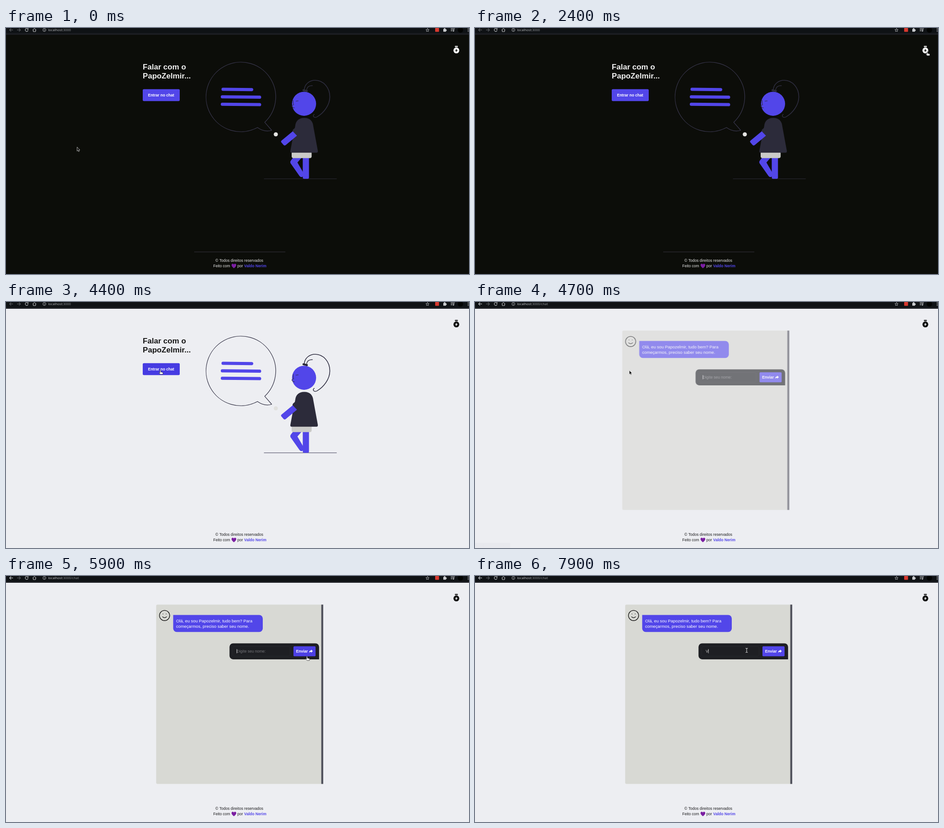
Write an HTML page with a canvas that moves like this. It is 1026x546 px and loops after 8000 ms.

```html
<!DOCTYPE html>
<html lang="pt">
<head>
<meta charset="utf-8">
<title>Chat</title>
<style>
  html, body { margin: 0; width: 100%; height: 100%; overflow: hidden; background: #0c0d09; }
  canvas { display: block; width: 1026px; height: 546px; }
</style>
</head>
<body>
<canvas id="stage" width="1026" height="546"></canvas>
<script>
const W = 1026, H = 546, LOOP = 8000, STEP = 100;
const SANS = '"Liberation Sans", Arial, sans-serif';
const UI = '"Noto Sans", "Open Sans", sans-serif';
const VIOLET = '#5246e9', INK = '#2f2e41', BODY = '#2c2b3a';
const THEMES = {
  dark: { bg: '#0c0d09', text: '#f0f0f0', foot: '#e6e6e6', icon: '#ffffff', line: '#36353f', outline: '#3a384f' },
  light: { bg: '#edeef2', text: '#161616', foot: '#1d1d1f', icon: '#101010', line: null, outline: '#2f2e41' }
};
const BUTTON = [303, 135.7, 82, 26.5], SEND = [637, 156, 49, 22.2];
const FIELD = [502.5, 156.5, 127, 21.5], TOGGLE = [989, 38, 19, 20];

// pointer way-points: time, x, y
const PATH = [
  [0, 157, 264], [200, 157, 264], [400, 296, 306], [500, 296, 306], [900, 374, 175], [1000, 374, 175],
  [1100, 372, 158], [1300, 350, 149], [1600, 366, 147], [1900, 987, 119], [2100, 996, 78], [2400, 1002, 52],
  [3700, 1002, 52], [3900, 940, 80], [4200, 430, 146], [4400, 342, 151], [5000, 341, 152],
  [5200, 318, 166], [5500, 560, 205], [5700, 650, 208], [5800, 650, 208], [5900, 667, 178],
  [6100, 664, 190], [6700, 642, 218], [6800, 644, 218], [7100, 606, 166], [7400, 615, 196],
  [7800, 615, 196], [7900, 602, 165], [8000, 602, 165]
];

const screen = document.getElementById('stage').getContext('2d');
const layerCanvas = document.createElement('canvas');
layerCanvas.width = W;
layerCanvas.height = H;
const layer = layerCanvas.getContext('2d');
let c = screen;

const clamp = v => Math.max(0, Math.min(1, v));
const inside = (p, [x, y, w, h]) => p.x >= x && p.x <= x + w && p.y >= y && p.y <= y + h;

function paint(path, fill, stroke, width = 1) {
  const shape = path instanceof Path2D ? path : new Path2D(path);
  if (fill) { c.fillStyle = fill; c.fill(shape); }
  if (stroke) {
    c.strokeStyle = stroke;
    c.lineWidth = width;
    c.lineCap = c.lineJoin = 'round';
    c.stroke(shape);
  }
}
function box(x, y, w, h, r, fill, stroke, width) {
  const p = new Path2D();
  p.roundRect(x, y, w, h, r);
  paint(p, fill, stroke, width);
}
function disc(x, y, r, fill, stroke, width) {
  const p = new Path2D();
  p.arc(x, y, r, 0, Math.PI * 2);
  paint(p, fill, stroke, width);
}
function text(str, x, y, size, color, bold, family = SANS) {
  c.font = `${bold ? 'bold ' : ''}${size}px ${family}`;
  c.fillStyle = color;
  c.fillText(str, x, y);
}
function at(x, y, draw) {
  c.save();
  c.translate(x, y);
  draw();
  c.restore();
}

function withLayer(alpha, dx, draw) {
  layer.clearRect(0, 0, W, H);
  c = layer;
  draw();
  c = screen;
  c.globalAlpha = alpha;
  c.drawImage(layerCanvas, dx, 0);
  c.globalAlpha = 1;
}

function toolbar(chat) {
  const lit = '#c9cbce', dim = '#5d6064';
  box(0, 0, W, 15, 0, '#1c1e23');
  box(0, 0, W, 11.5, 0, '#0f1215');
  paint('M15 4.4H8 M11 1.2L7.8 4.4L11 7.6', null, chat ? lit : dim, 1.1);
  paint('M25 4.4H32 M29 1.2L32.2 4.4L29 7.6', null, dim, 1.1);
  paint('M48.6 2.4A3.3 3.3 0 1 0 49 5.4', null, lit, 1.1);
  paint('M49.6 0.6V3.6H46.6Z', lit);
  paint('M59.2 4.4L63 0.8L66.8 4.4 M60.3 4V8H65.7V4', null, lit, 1);
  disc(85, 4.4, 3.4, null, '#b4b6b9', 0.9);
  paint('M85 4.2V6.2 M85 2.6V2.7', null, '#b4b6b9', 0.9);
  text('localhost', 93.4, 7, 7.45, chat ? '#c4c6c9' : '#b0b2b5', false, UI);
  const hostWidth = c.measureText('localhost').width;
  text(':3000' + (chat ? '/chat' : ''), 93.4 + hostWidth, 7, 7.45, '#8f9296', false, UI);

  const star = new Path2D();
  for (let i = 0; i < 10; i++) {
    const a = i * Math.PI / 5 - Math.PI / 2, r = i % 2 ? 1.8 : 3.8;
    star.lineTo(934 + r * Math.cos(a), 4.8 + r * Math.sin(a));
  }
  star.closePath();
  paint(star, null, lit, 0.8);
  box(951, 0, 8.6, 8.6, 1, '#d8392f');
  box(969, 2, 6.2, 6.2, 0.8, lit);
  disc(972, 1.6, 1.4, lit);
  disc(975.4, 5, 1.4, lit);
  paint('M986 1.6H991.5 M986 4H991.5 M986 6.4H989 M992.6 6.6V1.6H994.2', null, lit, 1);
  disc(991.6, 6.8, 1.3, lit);
  disc(1007, 4.4, 6, '#030403');
  for (const y of [1.4, 4.4, 7.4]) disc(1024.2, y, 0.9, lit);
}

function toggle(theme) {
  box(994.6, 39.8, 6.8, 2.3, 1, theme.icon);
  box(995.6, 42.9, 4.8, 3, 0.5, theme.icon);
  disc(998, 49.8, 6.5, theme.icon);
  paint('M999.3 45.8L994.9 50.6H997.4L996.6 54L1001.1 48.9H998.5Z', theme.bg);
}

function footer(theme) {
  if (theme.line) box(417, 496.4, 202, 1, 0, theme.line);
  text('© Todos direitos reservados', 464, 518.6, 8.55, theme.foot);
  text('Feito com', 459.2, 531.4, 8.55, theme.foot);
  text('por', 512.7, 531.4, 8.55, theme.foot);
  text('Valdo Nerim', 527.7, 531.4, 8.55, VIOLET, true);
  paint('M505 533.2C502 530.6 499.8 529 499.8 526.2C499.8 522.8 504 522.4 505 525.2' +
    'C506 522.4 510.2 522.8 510.2 526.2C510.2 529 508 530.6 505 533.2Z', '#7b1fa2');
}

function illustration(theme) {
  const bubble = new Path2D(), rad = Math.PI / 180;
  bubble.arc(520.5, 153, 77.2, 61.4 * rad, (360 + 46.8) * rad);
  bubble.lineTo(588.8, 227);
  bubble.bezierCurveTo(577, 231, 566, 227, 557.5, 221);
  paint(bubble, null, theme.outline, 1.2);
  paint('M481 136L544.4 136.8 M479.4 152.8L562 153.6 M479.4 169.3L562 170.1', null, VIOLET, 7);
  paint('M572 334.7H732.5', null, theme === THEMES.dark ? '#2e2d38' : '#3f3d56', 1.1);

  // ponytail and head
  paint('M660.8 138C661.5 124 673 116 685 116C704 116 717.6 133 717.6 153C717.6 171 704 189 689 197.4' +
    'C683 200.5 678 195 683 191.6', null, INK, 1.6);
  paint('M666 138C667 130.5 672 127.6 679 128', null, INK, 1.5);
  disc(660.5, 168.2, 26.7, VIOLET);
  at(663, 139.2, () => {
    c.rotate(0.25);
    box(-6, -2.2, 12, 4.4, 1.8, BODY);
  });
  paint('M642.6 162.2L647.6 161.7 M636.4 160.6C636 165 636.6 168 637.4 170.6C635.6 171.2 634 171 633.6 172.6' +
    'C633.4 174.4 634.4 175.2 635.6 175.4C635.4 176.8 637 177.2 639.4 177', null, INK, 1.1);

  // legs, skirt, torso, arm
  box(657.6, 285, 13.8, 49.8, 3, VIOLET);
  paint('M636 288L655 288L645.8 298.4L659.4 322Q661.5 326 658 329.5Q653.6 333 650.4 328.6' +
    'L630.4 300Q629 297 631 294.5Z', VIOLET);
  box(633, 274, 44.3, 14.8, 4, '#cacac8');
  paint('M641 217C642 206 649 199.4 661 199.4C673 199.4 680 206.5 680.8 217L691 272.6Q691.6 276.8 688 276.8' +
    'H633Q629.4 276.8 630.2 272.6L636.8 237Q633.6 229 636 225.4L640 222Z', BODY);
  paint('M635.4 229.2L644.8 239L620 259.8Q617.4 262 615 259.6L610.2 254Q608.4 251.6 611 249.4Z', VIOLET);
  disc(597.9, 236, 4.6, theme === THEMES.dark ? '#e4e4e2' : '#e1e1de');
}

function home(theme, hover) {
  text('Falar com o', 303, 91.6, 17.1, theme.text, true);
  text('PapoZelmir...', 303, 111.5, 17.1, theme.text, true);
  box(...BUTTON, 2.6, hover ? '#463be2' : VIOLET);
  text('Entrar no chat', 314.7, 152, 8.55, '#ffffff', true);
  illustration(theme);
}

function chat(hover, caret, typed) {
  box(332.8, 63.5, 370.2, 398, [3, 0, 0, 3], '#d8d9d4');
  box(698.6, 63.5, 4.4, 398, 0, '#53545e');
  disc(351.4, 87.7, 11.3, null, '#0e0e0e', 1.4);
  disc(347.9, 84.2, 0.8, '#0e0e0e');
  disc(354.9, 84.2, 0.8, '#0e0e0e');
  paint('M346.8 90.4Q351.4 95 356 90.4', null, '#0e0e0e', 1.2);

  box(370.5, 86.5, 198.5, 37.8, [0, 8, 8, 8], VIOLET);
  text('Olá, eu sou Papozelmir, tudo bem? Para', 377, 102.7, 9.4, '#ffffff');
  text('começarmos, preciso saber seu nome.', 377, 114.8, 9.4, '#ffffff');

  box(495.3, 149.4, 198.5, 35.5, [8, 8, 0, 8], '#1e1f23');
  box(...FIELD, 3, null, '#2a2b30', 0.8);
  if (typed) text(typed, 511.3, 170, 8.55, '#c8c8c8');
  else text('Digite seu nome:', 511.3, 170, 8.55, '#747579');
  if (caret) box(typed ? 516.8 : 511.2, 162.2, 0.9, 9.4, 0, '#e2e2e2');

  box(...SEND, 2, hover ? '#4c40e4' : VIOLET);
  text('Enviar', 642.8, 170, 8.55, '#ffffff', true);
  paint('M676 163.2L679.8 166.7L676 170.2V168.2C674 168 672.8 168.8 671.8 170.4C671.6 167.4 673 165.4 676 165.2Z', '#ffffff');
}

function statusBubble(alpha) {
  if (alpha <= 0) return;
  c.globalAlpha = alpha;
  box(0, 534.6, 78, 12, [0, 2, 0, 0], '#292a2d');
  text('localhost:3000/chat', 3, 543, 7, '#b9bbbe', false, UI);
  c.globalAlpha = 1;
}

function pointer(p, kind) {
  at(p.x, p.y, () => {
    if (kind === 'hand') {
      paint('M-1 1.2Q0 -0.6 1 1.2V4.3L5 5.2Q6.2 5.6 6 7L5.3 9.6H0.2L-2.9 6.4Q-2.8 5 -1 6Z', '#ffffff', '#111111', 0.7);
    } else if (kind === 'beam') {
      paint('M-2 -4.6Q0 -4.6 0 -3.4Q0 -4.6 2 -4.6 M0 -3.6V3.6 M-2 4.6Q0 4.6 0 3.4Q0 4.6 2 4.6', null, '#d6d6d6', 1.1);
    } else {
      paint('M0.5 0.5V9.2L2.5 7.4L3.9 10.4L5.3 9.8L4 6.9H6.4Z', '#0b0b0b', '#dcdcdc', 0.75);
    }
  });
}

function pointerAt(t) {
  const i = PATH.findIndex(k => k[0] > t), a = PATH[i - 1], b = PATH[i];
  const u = (t - a[0]) / (b[0] - a[0]);
  return { x: a[1] + (b[1] - a[1]) * u, y: a[2] + (b[2] - a[2]) * u };
}

function draw(time) {
  const t = Math.floor(time / STEP) * STEP;
  const theme = t < 2600 ? THEMES.dark : THEMES.light;
  const inChat = t > 4600;
  const p = pointerAt(t);
  const overEntry = !inChat && inside(p, BUTTON);
  const overSend = inChat && inside(p, SEND);

  c = screen;
  c.fillStyle = theme.bg;
  c.fillRect(0, 0, W, H);
  toolbar(t >= 4600);
  toggle(theme);
  footer(theme);

  if (!inChat) {
    const out = clamp((t - 4400) / 210);
    withLayer(1 - out, -16 * out, () => home(theme, overEntry));
  } else {
    const left = Math.pow(1 - clamp((t - 4620) / 460), 4.7);
    const caret = t >= 7900 || (t < 7400 && (t - 4650) % 1000 < 500);
    withLayer(1 - left, -16 * left, () => chat(overSend, caret, t >= 7900 ? 'V' : ''));
  }

  if (t >= 1300 && t < 2000) statusBubble(clamp((2000 - t) / 300));
  if (t >= 4500 && t <= 4700) statusBubble([0.8, 0.4, 0.02][(t - 4500) / STEP]);

  let kind = 'arrow';
  if (overEntry || overSend || inside(p, TOGGLE)) kind = 'hand';
  else if (inChat && inside(p, FIELD)) kind = 'beam';
  pointer(p, kind);
}

const start = performance.now();
function frame() {
  draw((performance.now() - start) % LOOP);
  requestAnimationFrame(frame);
}
frame();
</script>
</body>
</html>
```
